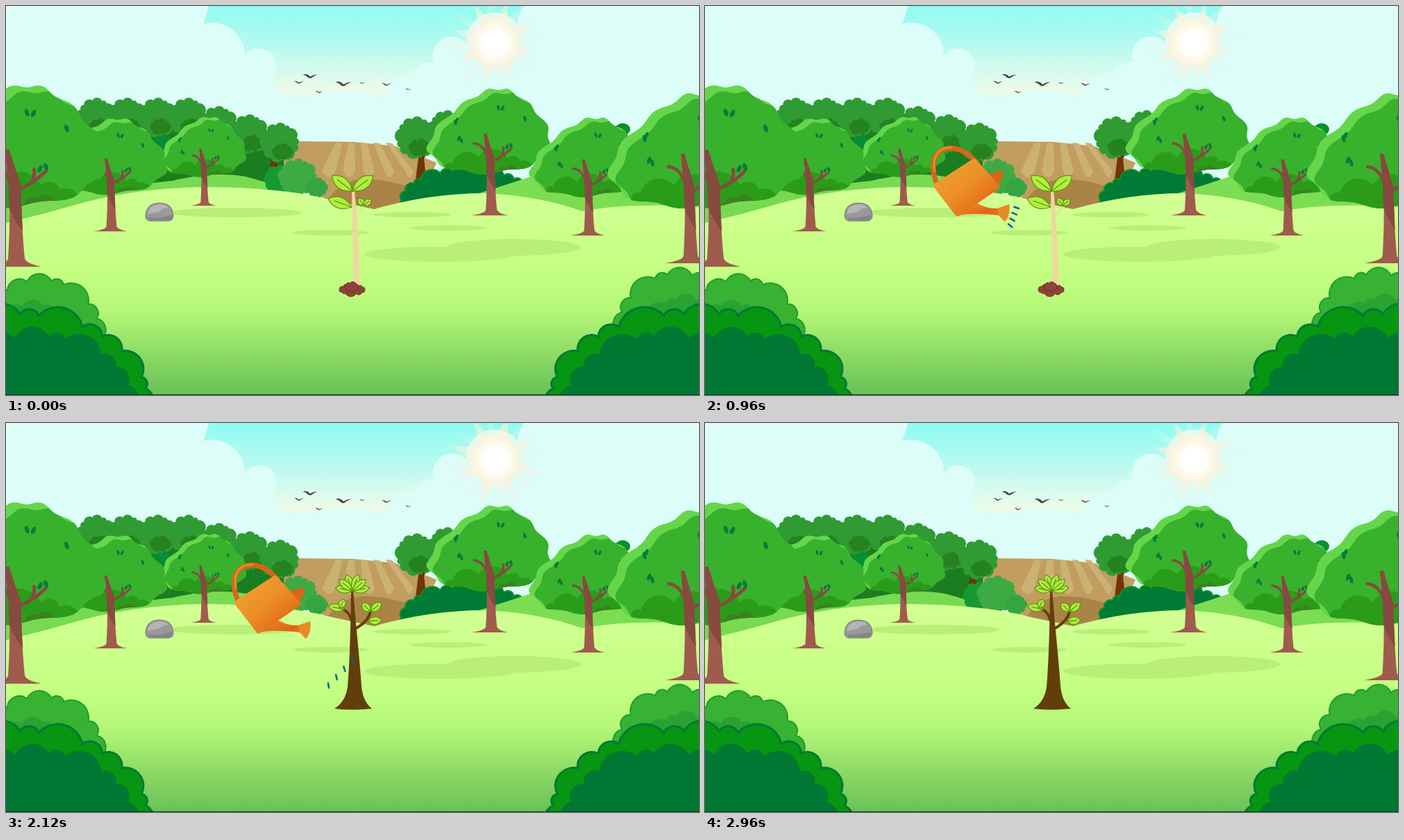
These frames come from a looping animation (998x561 px, 3000 ms). An HTML page:

```html
<!DOCTYPE html>
<html lang="en">
<head>
<meta charset="utf-8">
<title>Growing tree</title>
<style>
html, body { margin: 0; width: 100%; height: 100%; overflow: hidden; background: #dcfdf8; }
svg { display: block; width: 998px; height: 561px; }
</style>
</head>
<body>
<svg id="stage" viewBox="0 0 998 561"></svg>
<script>
const { PI, sin, cos, max, min, hypot, atan2 } = Math;
const stage = document.getElementById('stage');
const lerp = (a, b, p) => a + (b - a) * p;
const clamp = v => max(0, min(1, v));
const repeat = (n, make) => Array.from({ length: n }, (_, i) => make(i)).join('');
const path = (d, fill, extra = '') => `<path d="${d}" fill="${fill}" ${extra}/>`;
const line = (d, stroke, width, extra = '') =>
  path(d, 'none', `stroke="${stroke}" stroke-width="${width}" stroke-linecap="round" ${extra}`);
const oval = (x, y, rx, ry, fill, extra = '') =>
  `<ellipse cx="${x}" cy="${y}" rx="${rx}" ry="${ry}" fill="${fill}" ${extra}/>`;
const gradient = (id, stops, attrs, type = 'linear') => `<${type}Gradient id="${id}" ${attrs}>` +
  stops.map(([o, c, a = 1]) => `<stop offset="${o}" stop-color="${c}" stop-opacity="${a}"/>`).join('') + `</${type}Gradient>`;

// Ellipse edged with n slightly uneven round lobes
function blob(x, y, rx, ry, n, fill, extra = '') {
  const k = 1 - 1.6 / n;
  let d = '', px, py;
  for (let i = 0; i <= n; i++) {
    const a = (i + .25 * sin(i % n * 2.4)) / n * 2 * PI - 1.8;
    const qx = x + rx * k * cos(a), qy = y + ry * k * sin(a), r = hypot(qx - px, qy - py) * .56;
    d += i ? `A${r} ${r} 0 0 1 ${qx} ${qy}` : `M${qx} ${qy}`;
    [px, py] = [qx, qy];
  }
  return path(d + 'Z', fill, extra);
}

const crown = (x, y, r) => blob(x, y, r, r, 13, '#2f9b32') + blob(x + r * .15, y + r * .45, r * .6, r * .4, 9, '#25821f');
const backTrunk = x => path(`M${x - 7} 250L${x - 3} 218L${x - 11} 206L${x + 13} 206L${x + 5} 220L${x + 8} 250Z`, '#703407');
const bird = (x, y, w) => path('M-10 -2Q-4 -4 0 1Q4 -2 10 -2Q4 0 1 3Q-3 3 -4 1Q-6 -1 -10 -2Z', '#4a4346',
  `transform="translate(${x} ${y}) scale(${w / 20})"`);
const tree = (x, y, sx, sy = sx) => `<use href="#tree" transform="translate(${x} ${y}) scale(${sx} ${sy})"/>`;

// Dome that widens towards its base, with a wavy rim
const canopy = 'M' + Array.from({ length: 90 }, (_, i) => {
  const a = i / 45 * PI, up = sin(a), wave = 1 + .035 * sin(11 * a);
  return `${(((82 - 32 * up) * cos(a)) * wave + 10 * up).toFixed(1)} ${(-122 - 61 * up * wave).toFixed(1)}`;
}).join('L') + 'Z';

const down = 'x1="0" y1="0" x2="0" y2="1"';
const across = 'x1="0" y1="0" x2="1" y2="1"';

const defs = `<defs>
${gradient('sky', [[0, '#90fbf0'], [.45, '#bbfaf0'], [.85, '#eafbe9'], [1, '#eefae5']], down)}
${gradient('grass', [[0, '#d3ff94'], [.4, '#c4ff82'], [.6, '#b4f677'], [.85, '#84d462'], [1, '#68c257']], down)}
${gradient('glow', [[0, '#fff'], [.42, '#fff'], [.65, '#fffaea', .75], [1, '#fdf1d8', 0]], '', 'radial')}
${gradient('ray', [[0, '#fff3dc', .9], [.5, '#fdf0da', .65], [1, '#fdf0da', .1]], 'gradientUnits="userSpaceOnUse" cx="0" cy="0" r="82"', 'radial')}
${gradient('can', [[0, '#efab35'], [.5, '#eb8d25'], [1, '#dd5514']], across)}
${gradient('spout', [[0, '#f09a2c'], [.55, '#e2641a'], [1, '#e9892a']], across)}
<clipPath id="canopy"><path d="${canopy}"/></clipPath>
<g id="tree">
  <g clip-path="url(#canopy)">
    ${path(canopy, '#65d64a')}
    ${path(canopy, '#38b12d', 'transform="translate(9 6)"')}
    ${blob(-4, -62, 76, 26, 11, '#2b9c1a')}
    ${blob(24, -58, 24, 14, 7, '#3d8023')}
  </g>
  ${repeat(9, i => {
    const a = (i >> 1) * 2.4 + 2.5 + i % 2 * .12, x = 54 * cos(a), y = -126 + 30 * sin(a);
    return oval(x, y, 2, 4, '#087b3c', `transform="rotate(${i % 2 ? 25 : -18} ${x} ${y})"`);
  })}
  ${line('M-5 -82Q-10 -102 -25 -104M2 -78Q16 -84 28 -96M15 -85Q18 -92 17 -98', '#864a3e', 3.5)}
  ${path('M-29 0Q-9 -3 -8 -8Q-5 -60 -8 -88L-11 -118L-7 -118Q0 -95 4 -84Q5 -40 8 -8Q10 -3 24 0Z', '#9f5c4d')}
  ${path('M-7 -60L-8 -88L-11 -118L-7 -118Q0 -95 4 -84L6 -36Q-3 -48 -7 -60Z', '#864a3e')}
</g>
<g id="backBush">
  ${blob(50, 489, 97, 103, 18, '#37b232', 'stroke="#219c30" stroke-width="2"')}
  ${blob(40, 515, 80, 92, 18, '#2aa233')}
</g>
<g id="frontBush">
  ${blob(10, 572, 206, 136, 26, '#069612', 'stroke="#007a35" stroke-width="3"')}
  ${blob(45, 582, 150, 115, 21, '#007834')}
</g>
</defs>`;

const sky = '<rect width="998" height="140" fill="url(#sky)"/>' +
  path('M0 0H292Q289 14 284 26A47 47 0 0 1 344 72A22 22 0 0 1 385 100Q382 115 390 123Q420 134 436 129' +
    'Q486 120 528 127Q545 134 548 118Q574 92 588 96Q596 80 616 81' +
    'A28 28 0 0 1 663 53A41 41 0 0 1 736 25Q738 10 746 0H998V300H0Z', '#dcfdf8');

const birds = bird(438, 101, 21) + bird(422, 110, 14) + bird(451, 124, 11) + bird(486, 112, 23) +
  bird(513, 111, 8) + bird(548, 113, 14) + bird(579, 120, 8);

const field = path('M415 195L500 196L560 202L620 226L590 290L540 297L465 280L360 238Z', '#c19d60') +
  repeat(5, i => {
    const x = 475 + 18 * i, foot = 455 + 30 * i, w = 20 - 2 * i;
    return path(`M${x} 197L${foot} 238Q${foot + w / 2} 256 ${foot + w} 238L${x + 9} 198Z`, '#ccb175');
  }) +
  path('M462 282Q480 252 512 250Q550 248 600 268L590 292L540 297Z', '#aa8446');

const woods = path('M104 160L330 170L400 215V250L300 262H100Z', '#1c7d20') +
  blob(225, 204, 18, 21, 9, '#078e35') + backTrunk(385) +
  repeat(7, i => crown(130 + 44 * i, 161 + 12 * max(0, i - 3), 29)) +
  backTrunk(597) + crown(635, 177, 27) + crown(591, 190, 31);

const land = path('M0 265L110 266L240 252Q300 238 345 246Q385 256 420 274V320H0Z', '#78da50') +
  blob(393, 250, 23, 21, 11, '#159a33') + blob(420, 247, 29, 27, 13, '#3eaa44') + blob(448, 262, 17, 15, 9, '#34a541') +
  blob(665, 282, 102, 48, 25, '#007b35', 'stroke="#0d9227" stroke-width="2"') +
  path('M650 280Q720 258 765 243Q800 262 860 262H998V310H640Z', '#7cdd52') +
  path('M0 313Q55 300 110 284Q190 262 290 261Q400 262 465 279L530 293Q610 270 690 270Q770 274 830 296Q900 283 998 290V561H0Z', 'url(#grass)') +
  `<g fill="#b9ef78">${oval(330, 298, 95, 7) + oval(467, 327, 55, 4) + oval(585, 301, 56, 4) +
    oval(637, 320, 56, 4) + oval(625, 358, 109, 11) + oval(732, 348, 96, 12)}</g>`.replaceAll('fill="undefined"', '');

const rock = path('M201 302Q202 284 221 284Q240 284 241 302Q241 310 233 310H208Q201 310 201 302Z', '#999', 'stroke="#777"') +
  path('M204 300Q206 287 221 286Q230 286 234 291Q224 291 220 297Z', '#b5b5b5') +
  path('M203 304Q216 308 239 301Q240 309 233 309H208Z', '#858585');

const trees = oval(888, 178, 11, 9, '#0a8f33') + tree(286, 288, .7) + tree(152, 325, .93, .89) + tree(15, 376, 1.5, 1.43) +
  tree(699, 302, 1) + tree(840, 331, .93) + tree(986, 371, 1.28, 1.34);

const can = line('M333 254C322 224 332 204 357 205Q376 208 389 224', '#d9651c', 7) +
  line('M331 238C326 216 338 203 355 204', '#e98a2b', 3) +
  path('M403 243Q418 241 429 236Q431 247 423 257L414 265Z', '#da6419') +
  path('M360 303Q384 297 423 302L432 311Q440 302 438 286L421 292Q402 292 388 282Z', 'url(#spout)') +
  path('M423 302L432 311Q440 302 438 286L421 292Z', '#ea8a27') +
  path('M331 256L385 221Q389 219 392 223L424 259Q426 262 421 265L367 302Q363 305 360 301L330 262Q328 259 331 256Z', 'url(#can)');

stage.innerHTML = defs + sky + '<g id="sun"></g>' + birds + field + woods + land + rock + trees +
  '<g id="plant"></g><g id="pot">' + can + '</g><g id="water"></g>' +
  '<use href="#backBush"/><use href="#frontBush"/>' +
  '<use href="#backBush" transform="translate(1018 -9) scale(-1 1)"/>' +
  '<use href="#frontBush" transform="translate(997 0) scale(-1.04 1)"/>' +
  '<rect y="560" width="998" height="1" fill="#17351c"/>';

const [sun, plant, pot, water] = ['sun', 'plant', 'pot', 'water'].map(id => document.getElementById(id));

const star = (n, outer, inner, turn) => path(repeat(n * 2, i => {
  const a = turn + i * PI / n, r = i % 2 ? inner : outer;
  return `${i ? 'L' : 'M'}${r * cos(a)} ${r * sin(a)}`;
}) + 'Z', 'url(#ray)');

function drawSun(t) {
  const swell = (1 + cos((t - 380) / 500 * PI)) / 2;
  sun.innerHTML = `<g transform="translate(704 53)">${star(8, lerp(58, 80, swell), 28, .3)}` +
    `<g opacity=".5">${star(8, lerp(76, 62, swell), 22, .65)}</g>${oval(0, 0, 40, 40, 'url(#glow)')}</g>`;
}

// Angle in degrees from straight up; w is the control point's distance from the midrib
function leaf(x, y, angle, len, w) {
  return len < 1 ? '' : path(`M0 0Q${w} ${-len * .55} 0 ${-len}Q${-w} ${-len * .55} 0 0ZV${-len * .75}`, '#b0ee40',
    `stroke="#619713" stroke-width="1.3" stroke-linejoin="round" transform="translate(${x} ${y}) rotate(${angle})"`);
}

function drawPlant(t) {
  const p = clamp((t - 1000) / 880), g = (young, grown) => lerp(young, grown, p);
  const bark = `rgb(${g(236, 98)},${g(217, 63)},${g(160, 10)})`;
  const top = g(266, 241);
  const stem = `M${g(498, 497)} ${top}Q${g(499, 496)} 330 ${g(500, 492)} 380Q${g(500, 489)} 402 ${g(497, 473)} 412` +
    `Q500 415 ${g(511, 527)} 412Q${g(510, 514)} 402 ${g(509, 512)} 380Q${g(508, 509)} 340 505 300Q503 280 ${g(502, 500)} ${top}Z`;
  const mound = `<g transform="translate(498.5 415) scale(${1 - p})" stroke="#6d2b28">` +
    blob(0, -6, 22, 7, 10, '#904239') + blob(-1, -10, 12, 7, 7, '#904239') + '</g>';

  let foliage = '';
  for (const side of [-1, 1])
    for (const i of [0, 2, 1])
      foliage += leaf(499, top + 1, side * g(53, 20 + 30 * i), g(i === 1 ? 37 : 0, 25), g(i === 1 ? 17 : 0, 11));
  foliage += leaf(g(498, 487), g(290, 269), g(-70, -77), g(36, 23), g(16, 11)) +
    leaf(481, g(285, 267), 25, 14 * p, 10) +
    leaf(g(515, 525), g(288, 272), g(-32, -45), g(13, 17), g(9, 11)) +
    leaf(g(515, 525), g(288, 272), 50, g(14, 20), g(9, 11)) +
    leaf(g(510, 521), g(295, 286), 85, 20 * p, 11);

  plant.innerHTML =
    line(`M504 ${g(302, 296)}Q${g(511, 522)} ${g(297, 286)} ${g(515, 525)} ${g(288, 272)}`, bark, g(2, 4)) +
    line(`M${g(500, 497)} ${g(292, 284)}Q${g(499, 493)} ${g(290, 269)} ${g(498, 481)} ${g(290, 268)}`, bark, g(1, 3.5)) +
    path(stem, bark) + (p < 1 ? mound : '') + foliage;
}

// Four streams fan out of the rose and bend down; each burst wipes along them
function drawWater(t) {
  const wet = s => [920, 1530].some(start => s < (t - start) / 250 && s > (t - start - 250) / 400);
  water.innerHTML = repeat(16, i => {
    const stream = i % 4, s = (i >> 2) / 3;
    if (!wet(s)) return '';
    const dx = 50 - 8.5 * stream, dy = 52 + 3.3 * stream;
    const x = 449 - 3 * stream + dx * s * (1.35 - .35 * s);
    const y = 291 + 8.7 * stream + dy * s * (.45 + .55 * s);
    const angle = atan2(dy * (.45 + 1.1 * s), dx * (1.35 - .7 * s)) * 180 / PI;
    return line(`M${-4 - 3 * sin(PI * s)} 0H${3 + 3 * sin(PI * s)}`, '#0b63a5', 2.6,
      `transform="translate(${x} ${y}) rotate(${angle})"`);
  });
}

function draw(now) {
  const t = Math.floor(now % 3000 / 40) * 40;
  drawSun(t);
  drawPlant(t);
  drawWater(t);
  pot.setAttribute('opacity', min(clamp((t - 80) / 240), clamp((2800 - t) / 280)));
  requestAnimationFrame(() => draw(performance.now()));
}
draw(0);
</script>
</body>
</html>
```
